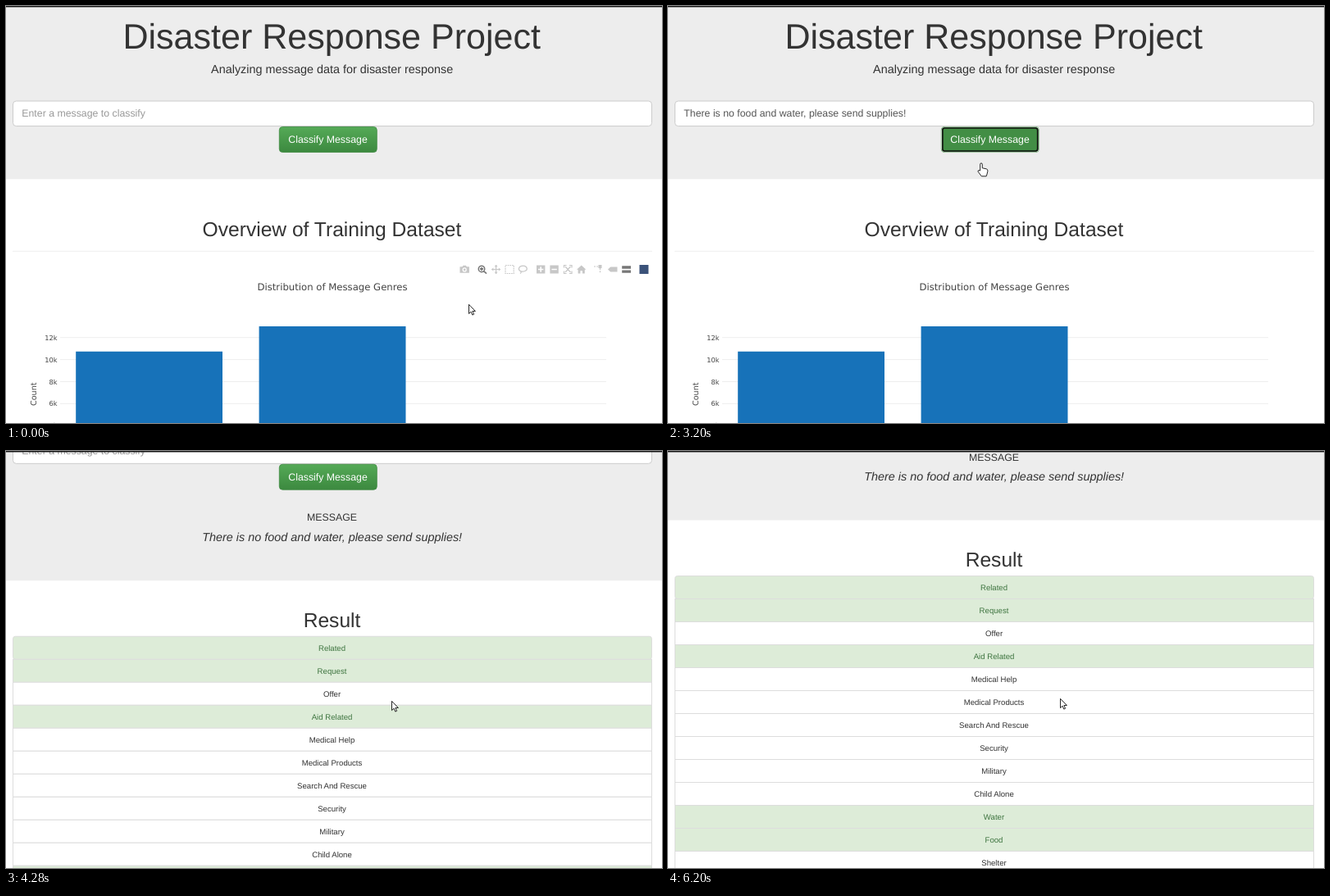
An HTML page for the animation above (6.52 s loop, 800 px wide and 509 px high).

```html
<!DOCTYPE html>
<html lang="en">
<head>
<meta charset="utf-8">
<title>Disaster Response Project</title>
<style>
  html, body { margin: 0; height: 100%; overflow: hidden; background: #fff; }
  svg { display: block; width: 100vw; height: 100vh; }
  text { font-family: "Liberation Sans", Arial, sans-serif; fill: #333; text-rendering: geometricPrecision; white-space: pre; }
  .mid text, text.mid { text-anchor: middle; }
  .h1 { font-size: 43.05px; }
  .h2 { font-size: 24.6px; }
  .lead { font-size: 14.4px; }
  .body { font-size: 12.32px; }
  .row { font-size: 9.62px; }
  #chart text { font-family: "DejaVu Sans", Verdana, sans-serif; fill: #444; }
  #chart .tick { font-size: 8.25px; text-anchor: end; }
  #popup text { font: 8.65px "Open Sans", "Noto Sans", sans-serif; fill: #111; stroke: #111; stroke-width: .25; }
  #bar { fill: none; stroke: #c7c7c7; stroke-width: 1.2; }
  #bar .solid { fill: #c7c7c7; stroke: none; }
  #bar .on { stroke: #777; stroke-width: 1.6; }
  .pointer { fill: #fff; stroke: #111; stroke-width: .9; stroke-linejoin: round; }
</style>
</head>
<body>
<svg viewBox="0 0 800 509">
  <defs>
    <linearGradient id="green" x2="0" y2="1">
      <stop stop-color="#55aa57"/><stop offset="1" stop-color="#3c893f"/>
    </linearGradient>
    <filter id="shadow" x="-5%" y="-5%" width="110%" height="112%">
      <feDropShadow dx="0" dy="1" stdDeviation="1.2" flood-opacity=".35"/>
    </filter>
  </defs>

  <g id="page">
    <rect id="jumbo" width="800" fill="#ededed"/>
    <g class="mid">
      <text class="h1" x="397.2" y="52">Disaster Response Project</text>
      <text class="lead" x="397.7" y="82">Analyzing message data for disaster response</text>
    </g>
    <rect x="8.5" y="116" width="779" height="30.6" rx="4" fill="#fff" stroke="#ccc"/>
    <text id="field" class="body" x="19.3" y="135.4"></text>
    <path id="caret" stroke="#222" stroke-width=".9"/>
    <rect id="button" x="333.3" y="147.5" width="119" height="31" rx="4" stroke="#3e8a40" stroke-width=".8"/>
    <g id="ring" fill="none">
      <rect x="333.5" y="147.7" width="118.6" height="30.6" rx="4" stroke="#fff" stroke-opacity=".6"/>
      <rect x="334.9" y="149" width="115.8" height="28" rx="2.5" stroke="#111" stroke-width="1.6"/>
    </g>
    <text class="body mid" x="392.5" y="167" style="fill:#fff">Classify Message</text>

    <g id="home">
      <text class="h2 mid" x="397.5" y="281.3">Overview of Training Dataset</text>
      <path d="M8 299.3H788" stroke="#eee"/>
      <g id="chart"></g>
      <g id="bar">
        <path class="solid" d="M553.5 318.3h3l1-1.6h3.4l1 1.6h3v7.5h-11.4z"/>
        <circle cx="559.2" cy="321.9" r="2" stroke="#fff"/>
        <path class="on" d="M576.3 320.9a3.7 3.7 0 0 1 7.4 0a3.7 3.7 0 0 1-7.4 0M582.7 323.6l3.3 3.1M578 320.9h4M580 318.9v4"/>
        <path d="M592.3 321.5h10.6M597.6 316.2v10.6"/>
        <path class="solid" d="M597.6 315.8l2 2.5h-4zM597.6 327.2l2-2.5h-4zM591.9 321.5l2.5-2v4zM603.3 321.5l-2.5-2v4z"/>
        <rect x="609" y="316.5" width="10.2" height="10" stroke-dasharray="1.7 1"/>
        <path d="M627 323.5c-3-2-1.5-6.3 3.5-6.3s6.5 4.6 2.5 6.3-6-.5-5.5 0 1.5 2-.5 3"/>
        <path class="solid" d="M647 316.5h10.4v10H647zM663.4 316.5h10.4v10h-10.4z"/>
        <path d="M649 321.5h6.4M652.2 318.3v6.4M665.4 321.5h6.4" stroke="#fff" stroke-width="1.6"/>
        <path d="M680.5 319.5v-3h3M687 316.5h3v3M690 323.5v3h-3M683.5 326.5h-3v-3M682 318l6.5 7M688.5 318l-6.5 7"/>
        <path class="solid" d="M696 321.8l5.7-5.3 5.7 5.3h-1.6v4.7h-2.8v-3.2h-2.6v3.2h-2.8v-4.7z"/>
        <path d="M717 318h7.5v8" stroke-dasharray="2 1.2"/>
        <path class="solid" d="M734 321.5l3.2-3h8.3v6h-8.3zM722.5 316h4v4h-4z"/>
        <path d="M751.2 319H762M751.2 324.2H762" stroke="#777" stroke-width="3.3"/>
        <rect x="772.5" y="316" width="11" height="11" fill="#3b5279" stroke="none"/>
      </g>
    </g>

    <g id="result" class="mid">
      <text class="body" x="397.5" y="216.5">MESSAGE</text>
      <text class="lead" x="397.7" y="241" font-style="italic">There is no food and water, please send supplies!</text>
      <text class="h2" x="397.5" y="346">Result</text>
      <g id="list"></g>
    </g>
  </g>

  <g id="popup">
    <rect x="7.7" y="148" width="221.3" height="158.5" rx="2" fill="#fff" filter="url(#shadow)"/>
    <rect id="hover" x="8" width="220.8" height="24.6" fill="#e9e9e9"/>
  </g>
  <rect width="800" height="1.4" fill="#111"/>

  <path id="arrow" class="pointer" d="M.5.3v11.3l2.6-2.4 1.7 3.9 1.8-.8-1.7-3.8h3.5z"/>
  <path id="hand" class="pointer" d="M-1.3 9V1.2a1.3 1.3 0 0 1 2.6 0V5.8l4.9 1q1.9.5 1.7 2.6l-.8 3.6-.9 2.8H.3L-3.8 10.3q-.6-1.6.8-1.7z"/>
  <path id="beam" fill="none" stroke="#222" stroke-width="1.1" d="M-2.5-6h2l.5.5.5-.5h2M0-5.5v11M-2.5 6h2l.5-.5.5.5h2"/>
</svg>

<script>
const LOOP = 6520, FOCUS = 1120, PICK = 2160, PRESS = 3080, LOAD = 3320;
const MESSAGE = 'There is no food and water, please send supplies!';
const $ = id => document.getElementById(id);
const show = (id, on) => $(id).style.display = on ? '' : 'none';
const set = (id, attrs) => { for (const k in attrs) $(id).setAttribute(k, attrs[k]); };

// Bar chart
let chart = '';
for (let k = 12; k >= 4; k -= 2) {
  const y = 404.7 + (12 - k) * 13.45;
  chart += `<path d="M66 ${y}H732" stroke="#eee"/><text class="tick" x="62.5" y="${y + 3}">${k}k</text>`;
}
$('chart').innerHTML = chart +
  `<path d="M85.2 421.7H264V520H85.2zM308.6 391H487.5V520H308.6z" fill="#1772b9"/>
   <text class="mid" x="398" y="347.3" font-size="11.68">Distribution of Message Genres</text>
   <text class="mid" transform="translate(37 473.7)rotate(-90)" font-size="9.6">Count</text>`;

// Classification rows; a star marks a match
const rows = ['Related*', 'Request*', 'Offer', 'Aid Related*', 'Medical Help', 'Medical Products',
  'Search And Rescue', 'Security', 'Military', 'Child Alone', 'Water*', 'Food*', 'Shelter'];
$('list').innerHTML = rows.map((name, i) => {
  const y = 357.5 + 28 * i, hit = name.endsWith('*');
  return `<rect x="8.5" y="${y}" width="779" height="28" rx="${i ? 0 : 3}" fill="${hit ? '#ddecd8' : '#fff'}" stroke="#ddd"/>
    <text class="row" x="397.5" y="${y + 17.5}" style="fill:${hit ? '#3f7540' : '#333'}">${name.replace('*', '')}</text>`;
}).join('');

const entries = ['water', 'i need food', MESSAGE, 'There is no water, no food', 'we need help', 'Tolivane'];
$('popup').insertAdjacentHTML('beforeend',
  entries.map((s, i) => `<text x="15.8" y="${169 + 24.6 * i}">${s}</text>`).join(''));

// Rows of [time, ...values], interpolated linearly
const mouse = [[40, 564, 364], [680, 434, 204], [960, 373, 131], [1640, 373, 131], [2040, 170, 215],
  [2720, 170, 215], [3000, 388, 166], [PRESS, 388, 166], [3200, 382, 192], [3360, 382, 192],
  [3880, 464, 305], [3960, 464, 305], [4280, 470, 305], [4760, 477, 304], [4800, 477, 303],
  [6199, 477, 303], [6200, 478, 302]];
const scroll = [[3880, 0], [3960, 21], [4280, 131], [4520, 190], [4720, 205]];

function at(keys, t) {
  const i = keys.findIndex(k => k[0] > t);
  if (i < 0) return keys[keys.length - 1].slice(1);
  if (!i) return keys[0].slice(1);
  const a = keys[i - 1], b = keys[i], p = (t - a[0]) / (b[0] - a[0]);
  return a.slice(1).map((v, j) => v + (b[j + 1] - v) * p);
}

function draw(t) {
  const [x, y] = at(mouse, t), loaded = t >= LOAD;
  const popup = t >= FOCUS && t < PICK;
  const inPopup = popup && x < 229 && y > 148;
  const item = Math.floor((y - 153.5) / 24.6);
  const filled = !loaded && (t >= PICK || inPopup && item === 2);
  const pressed = t >= PRESS && !loaded;
  const inButton = x > 333 && x < 452 && y > 147 && y < 179;

  set('page', { transform: `translate(0 ${-at(scroll, t)[0]})` });
  set('jumbo', { height: loaded ? 289.5 : 211.3 });
  show('home', !loaded);
  show('result', loaded);
  $('bar').style.opacity = Math.min(1, Math.max(0, (560 - t) / 300));

  $('field').textContent = filled ? MESSAGE : 'Enter a message to classify';
  $('field').style.fill = filled ? '#555' : '#999';
  set('caret', { d: `M${t >= PICK ? 291.6 : 20.2} 124.5v13.5` });
  show('caret', t >= FOCUS && t < PRESS && (t - FOCUS) % 1060 < 530);
  set('button', { fill: pressed || inButton && !loaded ? '#428e45' : 'url(#green)' });
  show('ring', pressed);

  show('popup', popup);
  show('hover', inPopup && item >= 0);
  set('hover', { y: 153.5 + 24.6 * item });

  const kind = loaded ? 'arrow' : inButton || pressed ? 'hand'
    : y > 116 && y < 147 ? 'beam' : 'arrow';
  for (const id of ['arrow', 'hand', 'beam']) show(id, id === kind);
  set(kind, { transform: `translate(${x} ${y})` });
}

const start = performance.now();
function tick(now) {
  draw(Math.max(0, now - start) % LOOP);
  requestAnimationFrame(tick);
}
draw(0);
requestAnimationFrame(tick);
</script>
</body>
</html>
```
